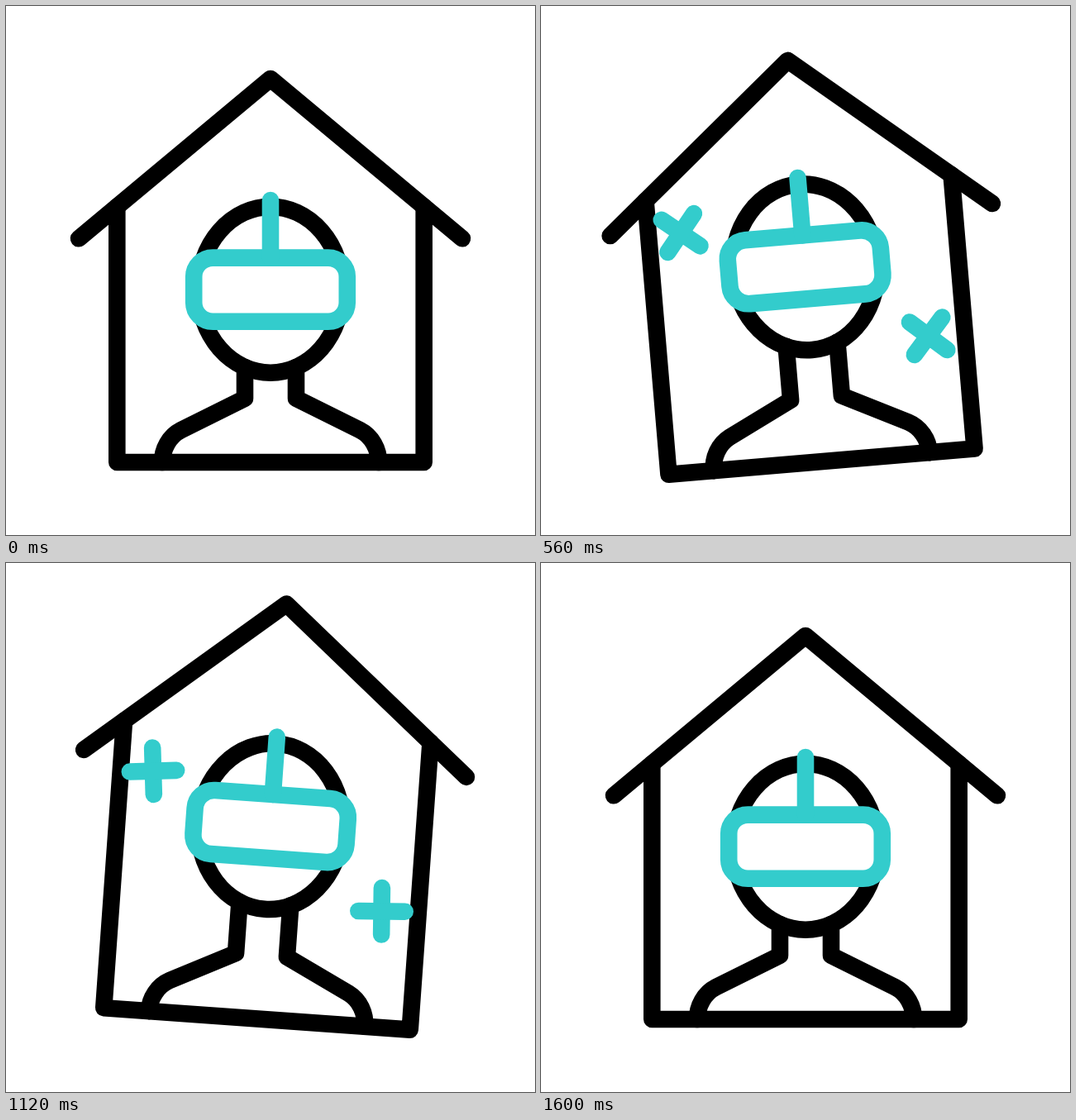
An HTML page with a canvas that plays this animation: 640x640 px, repeating every 1.64 s.

```html
<!DOCTYPE html>
<html>
<head>
<meta charset="utf-8">
<style>
html, body { margin: 0; width: 100%; height: 100%; overflow: hidden; background: #fff; }
canvas { display: block; }
</style>
</head>
<body>
<canvas id="stage" width="640" height="640"></canvas>
<script>
const ctx = document.getElementById('stage').getContext('2d');
const LOOP = 1640, STEP = 40;
const BLACK = '#000', TEAL = '#33cccc';

// Smooth progress from 0 to 1 between two times
function ease(t, start, end) {
  const s = Math.min(1, Math.max(0, (t - start) / (end - start)));
  return s * s * (3 - 2 * s);
}

function tilt(t) {
  return -4.83 * ease(t, 0, 440) + 9.05 * ease(t, 560, 1040) - 4.22 * ease(t, 1062, 1600);
}
const roofLift = t => 45.5 * (ease(t, 288, 828) - ease(t, 995, 1525));
const headLift = t => 36.6 * (ease(t, 210, 730) - ease(t, 922, 1440));

function line(color, ...points) {
  ctx.strokeStyle = color;
  ctx.beginPath();
  points.forEach(([x, y]) => ctx.lineTo(x, y));
  ctx.stroke();
}

function drawHouse(lift) {
  const eaves = 242.7 - lift;
  line(BLACK, [-185.7, eaves], [-185.7, 552], [185.7, 552], [185.7, eaves]);
  line(BLACK, [-232, 281.3 - lift], [0, 88 - lift], [232, 281.3 - lift]);
}

function drawBody(lift) {
  ctx.strokeStyle = BLACK;
  for (const side of [-1, 1]) {
    ctx.beginPath();
    ctx.moveTo(side * 31, 437 - lift);
    ctx.lineTo(side * 31, 474.7);
    ctx.lineTo(side * 108.5, 513.3);
    ctx.bezierCurveTo(side * 122.5, 520.5, side * 131, 536, side * 131, 552);
    ctx.stroke();
  }
}

function drawHead(lift) {
  ctx.save();
  ctx.translate(0, -lift);
  ctx.fillStyle = '#fff';
  ctx.strokeStyle = BLACK;
  ctx.beginPath();
  ctx.ellipse(0, 343.3, 87, 100.4, 0, 0, Math.PI * 2);
  ctx.stroke();
  ctx.strokeStyle = TEAL;
  ctx.beginPath();
  ctx.roundRect(-92.8, 304.6, 185.6, 77.2, 23);
  ctx.fill();
  ctx.stroke();
  line(TEAL, [0, 235], [0, 304.6]);
  ctx.restore();
}

// Spinning plus whose arms grow out and draw back in
function drawPlus(t, x, y, start) {
  const arm = 28.2 * (ease(t, start, start + 322) - ease(t, start + 1120, start + 1450));
  if (arm < 0.05) return;
  ctx.save();
  ctx.translate(x, y);
  ctx.rotate((t - start) * 0.081 * Math.PI / 180);
  line(TEAL, [-arm, 0], [arm, 0]);
  line(TEAL, [0, -arm], [0, arm]);
  ctx.restore();
}

function draw(t) {
  ctx.fillStyle = '#fff';
  ctx.fillRect(0, 0, 640, 640);
  ctx.lineWidth = 20.6;
  ctx.lineCap = ctx.lineJoin = 'round';
  ctx.save();
  ctx.translate(320, 320);
  ctx.rotate(tilt(t) * Math.PI / 180);
  ctx.translate(0, -320);
  drawHouse(roofLift(t));
  drawBody(headLift(t));
  drawHead(headLift(t));
  drawPlus(t, -146.5, 262, 80);
  drawPlus(t, 141.4, 411.5, 50);
  ctx.restore();
}

let origin;
function tick(now) {
  origin ??= now;
  const t = Math.max(0, now - origin) % LOOP;
  draw(Math.floor(t / STEP) * STEP);
  requestAnimationFrame(tick);
}
draw(0);
requestAnimationFrame(tick);
</script>
</body>
</html>
```
